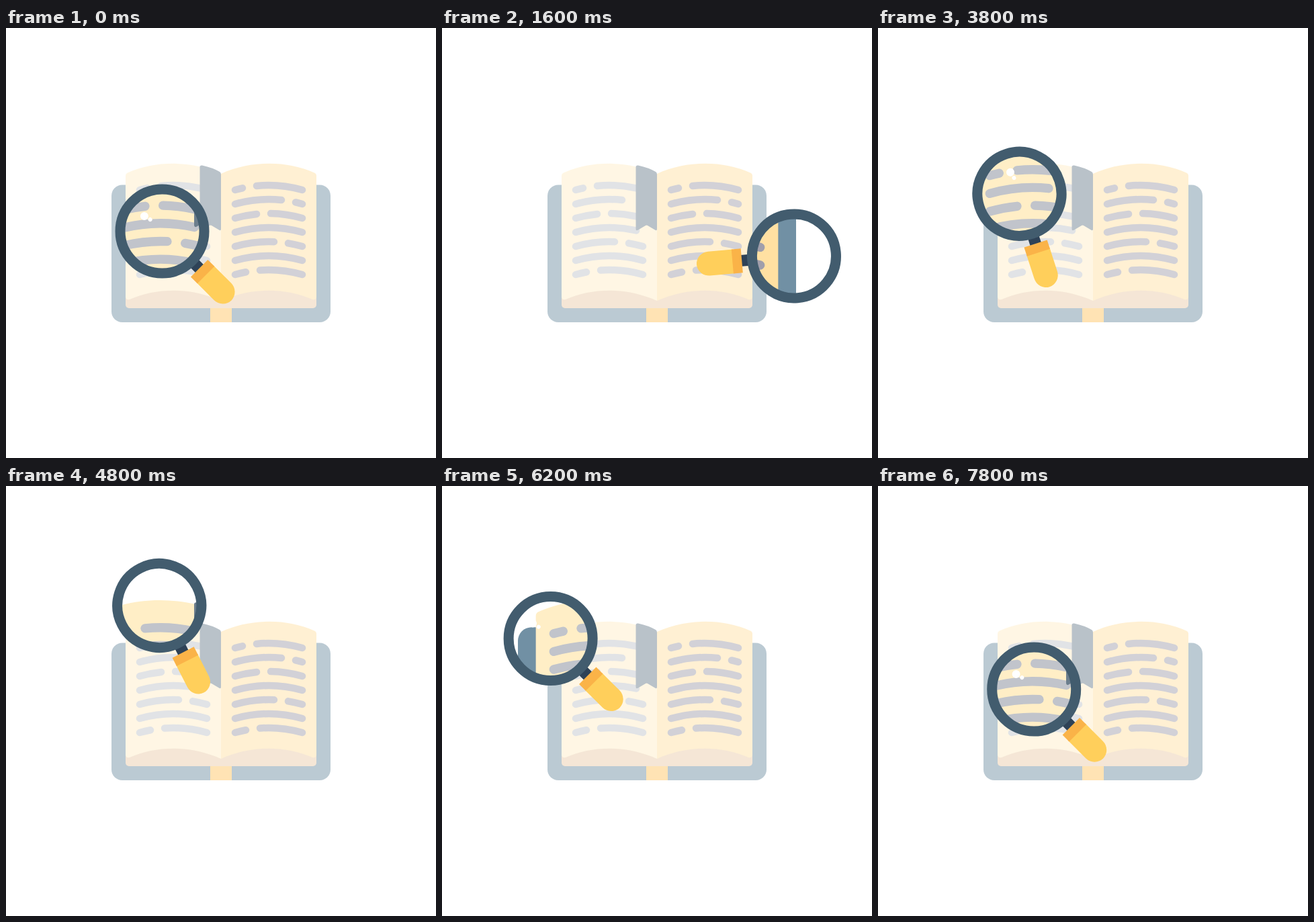
An HTML page that plays this animation: 640 by 640 pixels, repeating every 7.9 s.

```html
<!DOCTYPE html>
<html lang="en">
<head>
<meta charset="utf-8">
<title>Searching the book</title>
<style>
  html, body { margin: 0; width: 100%; height: 100%; overflow: hidden; background: #fff; }
  svg { display: block; width: 100vw; height: 100vh; }
</style>
</head>
<body>
<svg viewBox="0 0 640 640">
  <defs>
    <path id="page" d="M178 220Q178 217 181 215.500C222 197 277 197 320 217V406C275 386 225 386 184 404Q178 405 178 400Z"/>
    <g id="book">
      <rect x="157" y="233.500" width="326" height="204.500" rx="16" fill="#7190a4"/>
      <rect x="304" y="412" width="32" height="26" fill="#ffc462"/>
      <rect x="178" y="380" width="284" height="37" rx="5" fill="#eacca9"/>
      <use href="#page" fill="#ffeec6"/>
      <use href="#page" fill="#ffe0a2" transform="matrix(-1 0 0 1 640 0)"/>
      <g id="lines" fill="none" stroke-width="10.500" stroke-linecap="round"></g>
      <path fill="#6c7e8d" d="M288.500 207Q288.500 204 292 204.500Q308 208 318 214Q320 215 320 218V299Q320 302.500 317 300.500L306 294Q304.500 293 303 294L292 300.500Q288.500 302.500 288.500 299Z"/>
    </g>
    <clipPath id="lens"><circle id="hole" r="56"/></clipPath>
  </defs>
  <use href="#book" opacity=".47"/>
  <g clip-path="url(#lens)">
    <rect width="640" height="640" fill="#fff"/>
    <use href="#book" transform="translate(320 320) scale(1.27) translate(-320 -320)"/>
  </g>
  <g id="glass">
    <rect x="-8.500" y="66" width="17" height="16" fill="#2e4257"/>
    <path d="M-18 90H18V127A18 18.500 0 0 1 -18 127Z" fill="#ffcf5b"/>
    <rect x="-18" y="78" width="36" height="14" fill="#fab348"/>
    <circle r="62.500" fill="none" stroke="#425c6e" stroke-width="15"/>
    <circle cx="-2.900" cy="-34.700" r="6" fill="#fff"/>
    <circle cx="-.3" cy="-25" r="3" fill="#fff"/>
  </g>
</svg>
<script>
const $ = id => document.getElementById(id);

// Printed lines follow a shallow arch 100 units wide; most have one gap
const GAP = 21;
const gaps = [11, 69, 32, null, 58, null, 16];
const arch = x => -7 * (1 - ((x - 50) / 50) ** 2);
const slope = x => 14 * (x - 50) / 2500;

function dash(x, y, a, b) {
  if (a >= b) return '';
  const half = (b - a) / 2;
  return `M${x + a} ${y + arch(a)}Q${x + a + half} ${y + arch(a) + slope(a) * half} ${x + b} ${y + arch(b)}`;
}
// The first four rows may stop early, beside the bookmark
function print(x, color, topEnd) {
  const d = gaps.map((gap, i) => {
    const y = 241 + 21 * i, end = i < 4 ? topEnd : 100;
    return gap === null ? dash(x, y, 0, end) : dash(x, y, 0, gap) + dash(x, y, gap + GAP, end);
  });
  return `<path d="${d.join('')}" stroke="${color}"/>`;
}
$('lines').innerHTML = print(199, '#c1c4cb', 90) + print(341, '#a09eab', 100);

// Stops of the glass: it glides there from start to end, its path sagging by sag
const stop = (start, end, x, y, angle, sag) => ({ start, end, x, y, angle, sag });
const LOOP = 7900;
const stops = [
  stop(0, 850, 383, 161, -7, -82),
  stop(850, 1615, 524, 339.5, 85, -10),
  stop(1890, 2835, 208.5, 190, -18, -82),
  stop(3000, 3950, 210.5, 248.3, -18, 0),
  stop(4350, 5270, 239, 133, -32.5, 3),
  stop(5270, 5970, 157, 226.5, -45, -15),
  stop(6030, 6850, 198, 300.6, -45, -39),
  stop(6850, LOOP, 232.5, 302.5, -45, 6.5)
];

// cubic-bezier(.4, 0, .4, 1)
function ease(u) {
  let lo = 0, hi = 1;
  for (let i = 0; i < 20; i++) {
    const s = (lo + hi) / 2;
    if (1.2 * s * (1 - s) + s ** 3 < u) lo = s; else hi = s;
  }
  return lo * lo * (3 - 2 * lo);
}
const mix = (a, b, p) => a + (b - a) * p;

function pose(t) {
  const i = stops.findLastIndex(s => s.start <= t);
  const to = stops[i], from = stops.at(i - 1);
  const p = ease(Math.min(1, (t - to.start) / (to.end - to.start)));
  return {
    x: mix(from.x, to.x, p),
    y: mix(from.y, to.y, p) + 2 * p * (1 - p) * to.sag,
    angle: mix(from.angle, to.angle, p)
  };
}

function draw(time) {
  const { x, y, angle } = pose(time % LOOP);
  $('glass').setAttribute('transform', `translate(${x} ${y}) rotate(${angle})`);
  $('hole').setAttribute('cx', x);
  $('hole').setAttribute('cy', y);
}

let begin;
function tick(now) {
  begin ??= now;
  draw(now - begin);
  requestAnimationFrame(tick);
}
draw(0);
requestAnimationFrame(tick);
</script>
</body>
</html>
```
